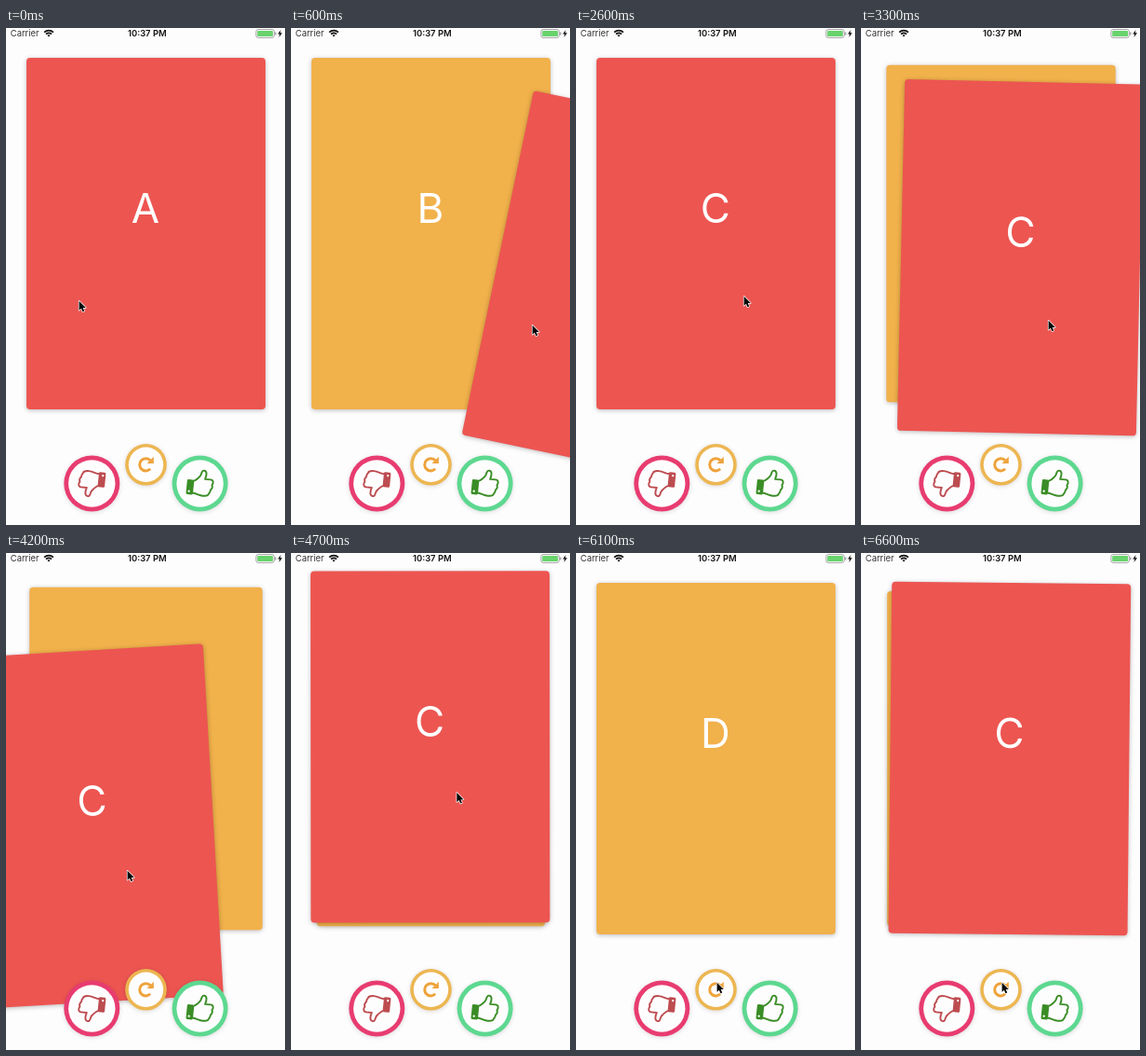
Write an HTML page with a canvas that moves like this. It is 300 px wide and 533 px high and loops after 6.7 s.

```html
<!DOCTYPE html>
<html lang="en">
<head>
<meta charset="utf-8">
<title>Swipe cards</title>
<style>
  html, body { margin: 0; width: 100%; height: 100%; overflow: hidden; background: #fefdfe; }
  canvas { display: block; width: 300px; height: 533px; }
</style>
</head>
<body>
<canvas id="stage"></canvas>
<script>
const W = 300, H = 533, LOOP = 6700, STEP = 100;
const PAPER = '#fefdfe', INK = '#111', GREY = '#8d8d8d';
const RED = '#ed5551', YELLOW = '#f1b14b';
const CARD = { x: 150.5, y: 220.5, w: 257, h: 377, r: 4 };
const REST = { x: 0, y: 0 };
const UNDO_AT = 6280;

const canvas = document.getElementById('stage');
const ctx = canvas.getContext('2d');
const dpr = window.devicePixelRatio || 1;
canvas.width = W * dpr;
canvas.height = H * dpr;

// Key points of the hand: time, x, y.
const pointerPath = [[100, 78, 292], [600, 259, 318], [1200, 130, 300], [1600, -45, 325],
  [2600, 180, 287], [3300, 201, 313], [4200, 130, 340], [4600, 183, 280], [5100, 132, 52],
  [6000, 151, 460]];
const dragPath = [[2600, 0, 0], [3300, 21, 25.6], [4200, -56, 72.5], [4600, 0, 0]];

// Eased travel through key points, resting before the first and after the last.
function glide(path, t) {
  let [from, x, y] = path[0];
  for (const [to, nx, ny] of path.slice(1)) {
    const p = Math.min(1, Math.max(0, (t - from) / (to - from)));
    const k = p * p * (3 - 2 * p);
    x += (nx - x) * k;
    y += (ny - y) * k;
    from = to;
  }
  return { x, y };
}

// Accelerating throw that passes (x, y) after the given time.
function fling(ms, duration, x, y) {
  const p = Math.max(0, ms / duration);
  return { x: x * p * p, y: y * p * p };
}

// Underdamped spring from the left edge back to rest.
function springBack(ms) {
  const s = ms / 1000, decay = 11.4, freq = 10.45;
  const wave = Math.cos(freq * s) + decay / freq * Math.sin(freq * s);
  return { x: -W * Math.exp(-decay * s) * wave, y: 0 };
}

function deckAt(t) {
  const A = ['A', RED], B = ['B', YELLOW], C = ['C', RED], D = ['D', YELLOW];
  if (t < 900) return { top: A, under: B, pos: fling(t - 100, 500, 197.5, 57.5) };
  if (t < 1900) return { top: B, under: C, pos: fling(t - 1200, 400, -184.8, 24.6) };
  if (t < 4600) return { top: C, under: D, pos: glide(dragPath, t) };
  if (t < 5400) return { top: C, under: D, pos: fling(t - 4600, 500, -20.5, -313.5) };
  if (t < UNDO_AT) return { top: D, pos: REST };
  return { top: C, under: D, pos: springBack(t - UNDO_AT) };
}

function shadow(alpha, blur, dy) {
  ctx.shadowColor = `rgba(0,0,0,${alpha})`;
  ctx.shadowBlur = blur * dpr;
  ctx.shadowOffsetY = dy * dpr;
}

function placed(x, y, draw) {
  ctx.save();
  ctx.translate(x, y);
  draw();
  ctx.restore();
}

function disc(x, y, r, color) {
  ctx.fillStyle = color;
  ctx.beginPath();
  ctx.arc(x, y, r, 0, Math.PI * 2);
  ctx.fill();
}

function box(x, y, w, h, r, color) {
  ctx.fillStyle = color;
  ctx.beginPath();
  ctx.roundRect(x, y, w, h, r);
  ctx.fill();
}

function label(text, x, y, font, color, align) {
  ctx.font = `${font} Inter, Roboto, sans-serif`;
  ctx.fillStyle = color;
  ctx.textAlign = align;
  ctx.fillText(text, x, y);
}

function drawCard([letter, color], pos, scale) {
  placed(CARD.x + pos.x, CARD.y + pos.y, () => {
    ctx.rotate(pos.x * 0.06 * Math.PI / 180);
    ctx.scale(scale, scale);
    ctx.save();
    shadow(0.27, 5, 1);
    box(-CARD.w / 2, -CARD.h / 2, CARD.w, CARD.h, CARD.r, color);
    ctx.restore();
    label(letter, -0.6, -11.5, '400 44px', '#fff', 'center');
  });
}

function ring(x, y, r, width, color) {
  ctx.save();
  shadow(0.15, 5, 1);
  disc(x, y, r, color);
  ctx.restore();
  disc(x, y, r - width, PAPER);
}

const hand = new Path2D('M-7-2C-4-3-2-6-.5-8C1-10 0-14 3-14C6.5-14 6.5-9.5 5-5H11' +
  'C14.5-5 14.5-1 13 .5C14 2.5 13 5 12 6C12 8.5 11 9.8 10.5 10.3' +
  'C10 13 7.5 13 4.5 13C0 13-3 11-7 11');

function thumb(x, y, color, angle) {
  placed(x, y, () => {
    ctx.rotate(angle);
    ctx.strokeStyle = color;
    ctx.lineWidth = 1.9;
    ctx.lineJoin = 'round';
    ctx.stroke(hand);
    box(-14, -3, 7.5, 16, 1.5, color);
    disc(-11, 9.5, 1.2, '#fff');
  });
}

function redo(x, y) {
  placed(x, y, () => {
    ctx.strokeStyle = ctx.fillStyle = '#eea33c';
    ctx.lineWidth = 3;
    ctx.beginPath();
    ctx.arc(0, 0, 6.6, 0.75, -0.75);
    ctx.stroke();
    ctx.fill(new Path2D('M8.5-8.5V-1.2H1.2Z'));
  });
}

function drawButtons() {
  ring(92.3, 488.5, 30, 4.8, '#e83c70');
  ring(208.6, 488.5, 30, 4.8, '#5dd890');
  ring(150.5, 468.3, 22.3, 3.6, '#ecb651');
  thumb(92.3, 488.5, '#bd4c50', Math.PI + 0.1);
  thumb(208.6, 488.3, '#3a8d26', 0.1);
  redo(150.3, 468.3);
}

function drawStatus() {
  label('Carrier', 4.8, 9.3, '400 9.4px', '#333', 'left');
  label('10:37 PM', 151.8, 9.3, '600 9.4px', INK, 'center');

  placed(46, 9.6, () => {
    ctx.strokeStyle = INK;
    ctx.lineWidth = 1.7;
    for (const r of [1.3, 4.2, 6.9]) {
      ctx.beginPath();
      ctx.arc(0, 0, r, -Math.PI * 0.75, -Math.PI * 0.25);
      ctx.stroke();
    }
  });

  ctx.strokeStyle = GREY;
  ctx.lineWidth = 0.8;
  ctx.beginPath();
  ctx.roundRect(268.9, 1.6, 19.4, 8.8, 2.2);
  ctx.stroke();
  box(270.2, 2.9, 16.8, 6.2, 1.2, '#68d36c');
  box(289.2, 4.6, 1.2, 2.8, 0, GREY);
  ctx.fillStyle = INK;
  ctx.fill(new Path2D('M295.6 2L292.2 6.5H294.3L293.5 10L297 5.3H294.8Z'));
}

const arrow = new Path2D('M0 0V12.2L2.8 9.7L4.7 14L6.9 13L5 8.9H8.8Z');

function drawPointer({ x, y }) {
  placed(x + 0.6, y + 0.8, () => {
    ctx.scale(0.82, 0.82);
    ctx.strokeStyle = '#fff';
    ctx.lineWidth = 1.7;
    ctx.lineJoin = 'round';
    ctx.stroke(arrow);
    ctx.fillStyle = '#050505';
    ctx.fill(arrow);
  });
}

function draw(t) {
  ctx.setTransform(dpr, 0, 0, dpr, 0, 0);
  ctx.fillStyle = PAPER;
  ctx.fillRect(0, 0, W, H);
  const { top, under, pos } = deckAt(t);
  if (under) {
    const grow = Math.min(1, 0.95 + 0.00027 * Math.hypot(pos.x, pos.y));
    drawCard(under, REST, grow);
  }
  drawCard(top, pos, 1);
  drawButtons();
  drawStatus();
  drawPointer(glide(pointerPath, t));
}

const start = performance.now();
function tick() {
  const t = (performance.now() - start) % LOOP;
  draw(Math.floor((t + 4) / STEP) * STEP % LOOP);
  requestAnimationFrame(tick);
}
tick();
</script>
</body>
</html>
```
